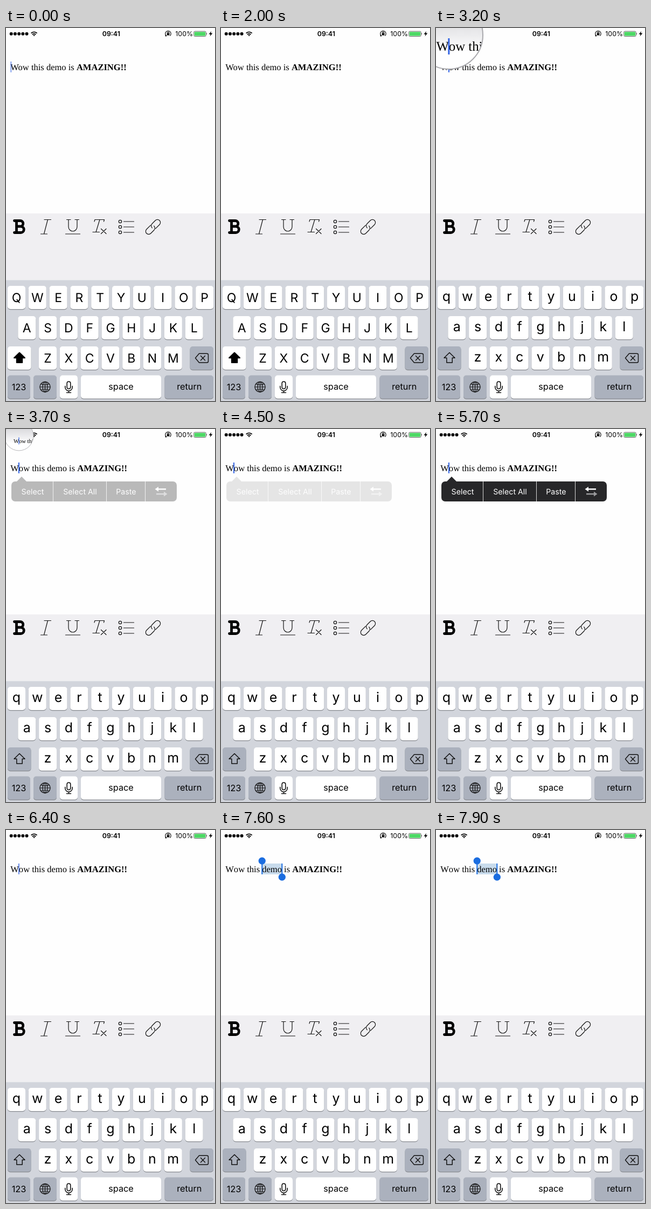
An HTML page for the animation above (8 s loop, 388 by 690 pixels).

```html
<!DOCTYPE html>
<html lang="en">
<head>
<meta charset="utf-8">
<title>Rich text editor on a phone</title>
<style>
  html, body { margin: 0; width: 100%; height: 100%; overflow: hidden; background: #fff; }
  svg { display: block; width: 388px; height: 690px; }
  text { font-family: Inter, Roboto, sans-serif; text-rendering: geometricPrecision; white-space: pre; }
  .mid { text-anchor: middle; }
  #words { font: 16.55px "Liberation Serif", serif; }
  .upper { font-size: 23px; }
  .lower { font-size: 25px; }
  .label { font-size: 16.3px; }
  .menu { font-size: 14.2px; fill: #fff; }
  .line { fill: none; stroke: #111; stroke-width: 1.2; stroke-linecap: round; stroke-linejoin: round; }
</style>
</head>
<body>
<svg viewBox="0 0 388 690">
  <defs>
    <linearGradient id="glass" x1="0" y1="0" x2="0" y2="1">
      <stop offset="0" stop-color="#c9c9cd"/>
      <stop offset=".5" stop-color="#ececee"/>
      <stop offset=".75" stop-color="#fff"/>
    </linearGradient>
    <clipPath id="lens"><circle r="63"/></clipPath>
  </defs>
  <rect width="388" height="690" fill="#fefefe"/>

  <g id="status">
    <g id="signal"></g>
    <g fill="none" stroke="#000" stroke-width="1.9">
      <path d="M46.6 9.6a7.8 7.8 0 0 1 11 0M48.8 12a4.7 4.7 0 0 1 6.6 0"/>
    </g>
    <path d="M50.4 13.4a2.5 2.5 0 0 1 3.4 0L52.1 15.3Z"/>
    <text class="mid" x="195.3" y="15" font-size="12.4" font-weight="600">09:41</text>
    <path class="line" d="M297.3 14.2A5.2 5.2 0 1 1 304.7 14.2M299.6 9.8V8.8a1.5 1.5 0 0 1 3 0V9.8"/>
    <path d="M298.8 9.6h4.6v3.8h-4.6zM295.8 12.2l3.2 2.9-3.4 .5z"/>
    <text x="314.3" y="15" font-size="12.4">100%</text>
    <rect x="348.7" y="6.1" width="22.6" height="9.4" rx="2" fill="none" stroke="#444" stroke-width=".8"/>
    <rect x="349.8" y="7.2" width="20.4" height="7.2" rx="1" fill="#4cd964"/>
    <path d="M372.4 9q1.6 1.8 0 3.6z"/>
    <path d="M381.2 5.8 376.6 11.4H379.6L378.6 15.4 383.4 9.6H380.2Z"/>
  </g>

  <g id="content">
    <rect id="highlight" x="76.3" y="62" width="37" height="20" fill="#c8dbec"/>
    <text id="words" x="8.28" y="77.6">Wow this demo is <tspan font-weight="bold">AMAZING!!</tspan></text>
    <rect id="caret" y="62" width="2" height="20" fill="#3465e4"/>
  </g>
  <g id="handles" fill="#1b6de0">
    <path d="M75.2 61h2v21h-2zM112.3 62h2v21h-2z"/>
    <circle cx="76.2" cy="57.2"/>
    <circle cx="113.3" cy="87.2"/>
  </g>

  <g id="menu">
    <path d="M17 97H20L29 88 38 97H310a7 7 0 0 1 7 7V127a7 7 0 0 1-7 7H17a7 7 0 0 1-7-7V104a7 7 0 0 1 7-7Z" fill="#272729"/>
    <path d="M87.5 97V134M186.5 97V134M258.5 97V134" stroke="#d8d8d8"/>
    <g class="menu mid">
      <text x="49.5" y="121">Select</text>
      <text x="137.5" y="121">Select All</text>
      <text x="222.8" y="121">Paste</text>
    </g>
    <path d="M276.5 111.3 283 106.8V110H297V112.6H283V115.8Z" fill="#fff"/>
    <path d="M299.5 120.3 293 115.8V119H279V121.6H293V124.8Z" fill="#99999b"/>
  </g>

  <g id="toolbar">
    <rect y="343" width="388" height="124" fill="#f0eff2"/>
    <path class="line" stroke-width="5" style="stroke-width:4.8;stroke:#000" d="M15.5 356.5H26.5a5.2 5.2 0 0 1 0 10.5H19.5M26.5 367h1a5.7 5.7 0 0 1 0 11.5H15.5M19.5 356.5V378.5"/>
    <path class="line" d="M71 354.5H83.5M64.5 381H76.5M77.5 354.5 70.5 381"/>
    <path class="line" d="M112.5 354.5H120M128 354.5H135.5M116 354.5V367.5a8 8.5 0 0 0 16 0V354.5M110.5 381H137.5"/>
    <path class="line" d="M164 358 165 354.5H182.5L181.5 358M174 354.5 167 377.5M161 377.5H173.5M176.5 371.5 186 380.5M186 371.5 176.5 380.5"/>
    <g id="bullets" class="line"></g>
    <g id="chain" class="line" transform="translate(273 368) rotate(-45)"></g>
  </g>

  <g id="keyboard">
    <rect y="466.5" width="388" height="223.5" fill="#d2d5dc"/>
    <g id="keys"></g>
    <g id="upper"></g>
    <g id="lower"></g>
    <g class="label mid">
      <text x="24" y="670">123</text>
      <text x="213.5" y="669">space</text>
      <text x="340.3" y="669">return</text>
    </g>
    <g class="line">
      <path d="M351.5 610.5 358.5 602.2H373a2.5 2.5 0 0 1 2.5 2.5V616.5a2.5 2.5 0 0 1-2.5 2.5H358.5ZM361.5 606.5 369.5 614.7M369.5 606.5 361.5 614.7" style="stroke-width:1.4"/>
      <circle cx="72.5" cy="664" r="9.6"/>
      <ellipse cx="72.5" cy="664" rx="4.6" ry="9.6"/>
      <path d="M72.5 654.4V673.6M62.9 664H82.1M64.8 658.5Q72.5 661.5 80.2 658.5M64.8 669.5Q72.5 666.5 80.2 669.5"/>
      <rect x="113.2" y="654" width="6.6" height="13.5" rx="3.3" style="stroke-width:1.6"/>
      <path d="M109.8 662.5V664.5a6.7 6.7 0 0 0 13.4 0V662.5M116.5 671.2V674.5M112.5 674.5H120.5" style="stroke-width:1.6"/>
    </g>
  </g>

  <g id="loupe">
    <circle r="63" fill="url(#glass)"/>
    <g clip-path="url(#lens)">
      <use href="#content" transform="translate(0 21) scale(1.5) translate(-24 -72)"/>
    </g>
    <circle r="63" fill="none" stroke="#a9a9ad" stroke-width="2"/>
  </g>
</svg>

<script>
const $ = id => document.getElementById(id);
const clamp = v => Math.max(0, Math.min(1, v));
const ramp = (t, from, to) => clamp((t - from) / (to - from));
const show = (id, alpha) => {
  $(id).style.opacity = alpha;
  $(id).style.display = alpha > 0 ? "" : "none";
};

const key = (x, y, w, fill = "#fff") =>
  `<rect x="${x}" y="${y + 1.2}" width="${w}" height="43" rx="5" fill="#888b91"/>
   <rect x="${x}" y="${y}" width="${w}" height="43" rx="5" fill="${fill}"/>`;
const DARK = "#abb1bd";
const ROWS = [["QWERTYUIOP", 3, 477], ["ASDFGHJKL", 22.3, 533], ["ZXCVBNM", 61, 589]];
const ARROW = "M25 600.5 35 610.3H30.2V619H19.8V610.3H15Z";

let keys = "", upper = "", lower = "";
for (const [letters, left, y] of ROWS)
  [...letters].forEach((c, i) => {
    const x = left + i * 38.8, mid = x + 16.5;
    keys += key(x, y, 33);
    upper += `<text class="upper mid" x="${mid}" y="${y + 30}">${c}</text>`;
    lower += `<text class="lower mid" x="${mid}" y="${y + 28}">${c.toLowerCase()}</text>`;
  });
keys += key(341.5, 589, 43.5, DARK) + key(3, 642.5, 42, DARK) + key(51, 642.5, 43, DARK) +
  key(100, 642.5, 33) + key(139, 642.5, 149) + key(294.5, 642.5, 90.5, DARK);
$("keys").innerHTML = keys;
$("upper").innerHTML = key(3, 589, 43.5) + upper +
  `<path d="${ARROW}" stroke="#000" stroke-width="2" stroke-linejoin="round"/>`;
$("lower").innerHTML = key(3, 589, 43.5, DARK) + lower +
  `<path class="line" style="stroke-width:1.5" d="${ARROW}"/>`;

$("signal").innerHTML = [0, 1, 2, 3, 4].map(i => `<circle cx="${9.7 + i * 7.2}" cy="10.7" r="3"/>`).join("");
$("bullets").innerHTML = [358, 368, 378].map(y =>
  `<circle cx="212" cy="${y}" r="2.7"/><path d="M218.5 ${y}H237.5"/>`).join("");
const LINK = "M-1-5.5H-11.5a5.5 5.5 0 0 0 0 11H-3a5.5 5.5 0 0 0 5.5-5.5";
$("chain").innerHTML = `<path d="${LINK}"/><path d="${LINK}" transform="rotate(180)"/>`;

const LOOP = 8000, STEP = 100, MOVED = 2900;

function caretAlpha(t) {
  if (t < 2800) {
    const p = t % 960;
    return p < 400 ? clamp(0.6 - p / 120) : ramp(p, 400, 520);
  }
  if (t < 5400) return 1 - ramp(t, 4900, 5100);
  return 1 - ramp(t, 6330, 6600);
}

function draw(now) {
  const t = Math.floor(now % LOOP / STEP) * STEP;
  const moved = t >= MOVED, selected = t >= 7300;

  show("upper", moved ? 0 : 1);
  show("lower", moved ? 1 : 0);
  $("words").style.fontKerning = moved ? "none" : "normal";
  $("caret").setAttribute("x", moved ? 22.9 : 8.3);
  show("caret", caretAlpha(t));

  show("menu", t < 5000
    ? ramp(t, 3640, 3830) - ramp(t, 4100, 4550)
    : ramp(t, 5400, 5650) - ramp(t, 5820, 6000));

  const zoom = ramp(t, 2700, 3000) - ramp(t, 3580, 3790);
  show("loupe", zoom > 0 ? 1 : 0);
  $("loupe").setAttribute("transform", `translate(24 13) scale(${zoom})`);

  show("highlight", selected ? 1 : 0);
  show("handles", selected ? 1 : 0);
  for (const dot of $("handles").querySelectorAll("circle"))
    dot.setAttribute("r", 6.6 * ramp(t, 7200, 7500));
}

const start = performance.now();
function tick() {
  draw(performance.now() - start);
  requestAnimationFrame(tick);
}
tick();
</script>
</body>
</html>
```
